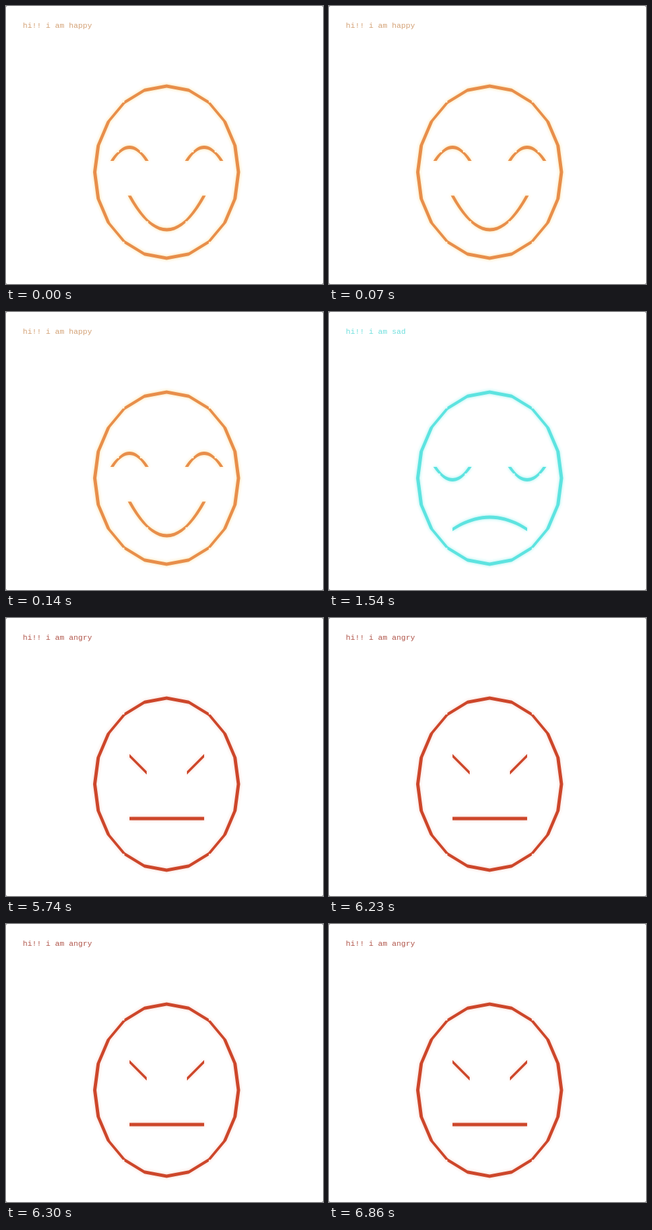
Animation, 480 px wide and 420 px high, one loop 8 s. Source, as an HTML page with a canvas:

```html
<!DOCTYPE html>
<html lang="en">
<head>
<meta charset="utf-8">
<title>Moods</title>
<style>
  html, body { margin: 0; height: 100%; overflow: hidden; background: #888; }
  canvas { display: block; background: #fff; border-radius: 2.5px; }
</style>
</head>
<body>
<canvas id="stage" width="480" height="420"></canvas>
<script>
const ctx = document.getElementById('stage').getContext('2d');
const LOOP = 8000, HALF = 2.5, CX = 243.2;

// A stroke whose ends are cut along an axis, so joints notch where the slope passes 45°.
function segment(x1, y1, x2, y2) {
  const dx = x2 - x1, dy = y2 - y1;
  const wide = Math.abs(dx) >= Math.abs(dy);
  const ox = wide ? 0 : -HALF * Math.sign(dy);
  const oy = wide ? HALF * Math.sign(dx) : 0;
  ctx.moveTo(x1 - ox, y1 - oy);
  ctx.lineTo(x2 - ox, y2 - oy);
  ctx.lineTo(x2 + ox, y2 + oy);
  ctx.lineTo(x1 + ox, y1 + oy);
  ctx.closePath();
}

function curve(pointAt, steps = 20) {
  for (let i = 0; i < steps; i++) {
    segment(...pointAt(i / steps), ...pointAt((i + 1) / steps));
  }
}

const oval = (cx, cy, rx, ry) => curve(t => {
  const a = t * 2 * Math.PI;
  return [cx + rx * Math.sin(a), cy - ry * Math.cos(a)];
});

// Parabola between two level ends; a positive depth sags downwards.
const arc = (x1, x2, y, depth) => curve(t =>
  [x1 + (x2 - x1) * t, y + depth * 4 * t * (1 - t)]);

function eyeArcs(depth) {
  arc(160.5, 213.5, 234, depth);
  arc(273.5, 326.5, 234, depth);
}

const moods = [
  { from: 0, name: 'happy', line: '#e88e4b', glow: '#f8dc9a', text: '#d3a175', draw() {
    eyeArcs(-20.5);
    arc(187, 300, 286.5, 51.5);
  } },
  { from: 1540, name: 'sad', line: '#5de3e0', glow: '#9cf0ee', text: '#6fdfdd', draw() {
    eyeArcs(19.5);
    arc(187, 300, 328.5, -18.5);
  } },
  { from: 3640, name: 'surprise', line: '#f4e442', glow: '#fbf3a0', text: '#f3e265', draw() {
    oval(188.8, 238, 13.5, 15.5);
    oval(299.6, 238, 13.5, 15.5);
    oval(CX, 329.5, 15, 26);
  } },
  { from: 5740, name: 'angry', line: '#cd462a', glow: '#f3cfc4', text: '#b0564b', draw() {
    segment(187, 208, 213, 234);
    segment(274, 234, 300, 208);
    segment(187, 303, 300, 303);
  } },
];

function render(now) {
  const time = now % LOOP;
  const mood = moods.findLast(m => time >= m.from);

  ctx.clearRect(0, 0, 480, 420);
  ctx.shadowBlur = 0;
  ctx.fillStyle = mood.text;
  ctx.font = '11.667px "Liberation Mono", monospace';
  ctx.fillText('hi!! i am ' + mood.name, 25.4, 33.3);

  ctx.shadowBlur = 5;
  ctx.shadowColor = mood.glow;
  ctx.fillStyle = mood.line;
  ctx.beginPath();
  oval(CX, 251, 108.8, 130);
  mood.draw();
  ctx.fill();
}

const start = performance.now();
function tick() {
  render(performance.now() - start);
  requestAnimationFrame(tick);
}
tick();
</script>
</body>
</html>
```
